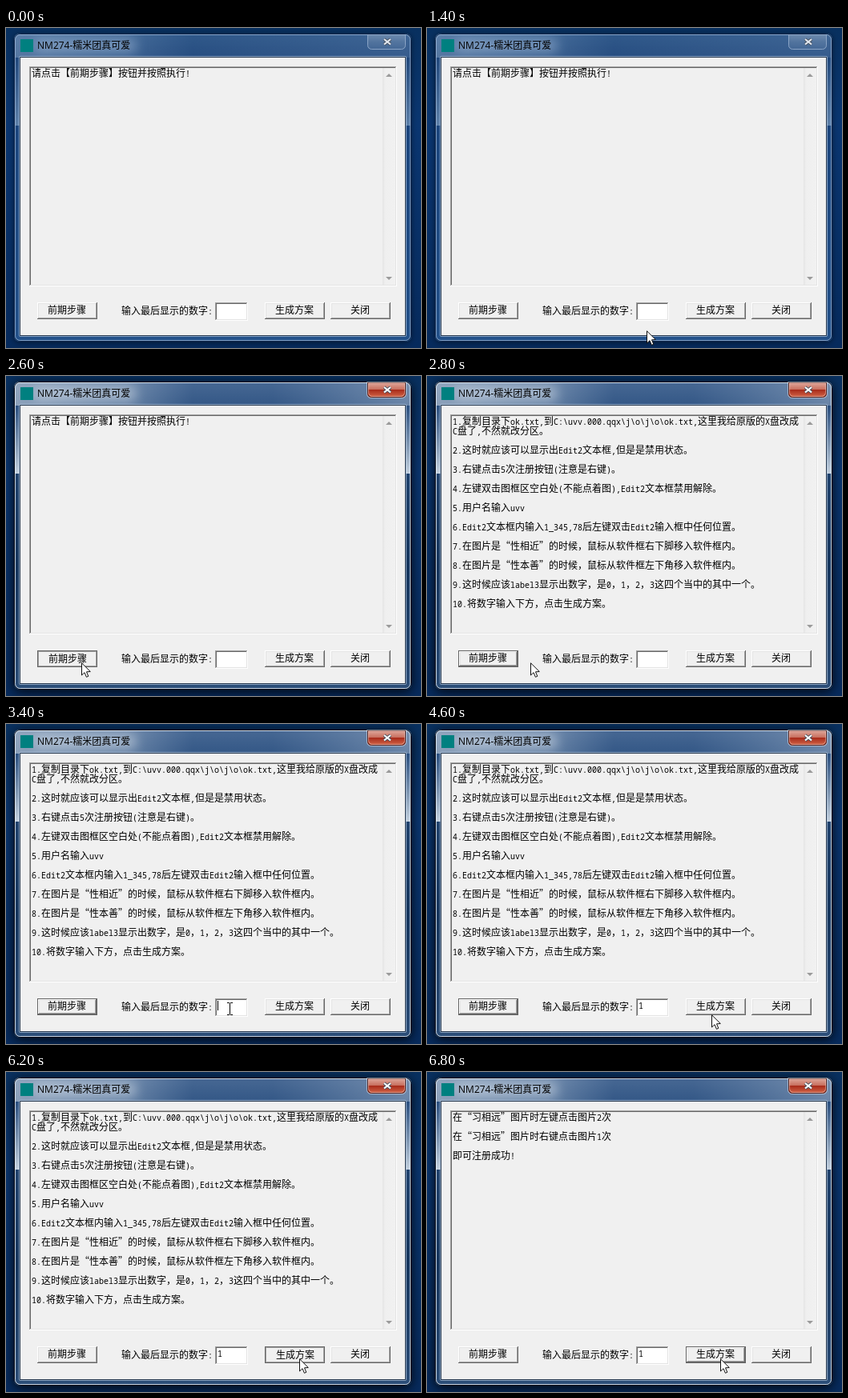
Write an HTML page with a canvas that moves like this. It is 518 px wide and 400 px high and loops after 8000 ms.

```html
<!DOCTYPE html>
<html lang="zh-CN">
<head>
<meta charset="utf-8">
<style>
html, body { margin: 0; width: 100%; height: 100%; overflow: hidden; background: #082d61; }
canvas { display: block; }
</style>
</head>
<body>
<canvas id="stage" width="518" height="400"></canvas>
<script>
const g = document.getElementById('stage').getContext('2d');
const LOOP = 8000;
const CJK = '500 12px "Noto Sans CJK SC", "Noto Sans CJK", sans-serif';
const MONO = '500 10px "Noto Sans Mono", monospace';
const TITLE = '12px "Open Sans", "Noto Sans CJK SC", "Noto Sans CJK", sans-serif';

const INTRO = ['请点击【前期步骤】按钮并按照执行!'];
const STEPS = [
  '1.复制目录下ok.txt,到C:\\uvv.000.qqx\\j\\o\\j\\o\\ok.txt,这里我给原版的X盘改成',
  'C盘了,不然就改分区。', '',
  '2.这时就应该可以显示出Edit2文本框,但是是禁用状态。', '',
  '3.右键点击5次注册按钮(注意是右键)。', '',
  '4.左键双击图框区空白处(不能点着图),Edit2文本框禁用解除。', '',
  '5.用户名输入uvv', '',
  '6.Edit2文本框内输入1_345,78后左键双击Edit2输入框中任何位置。', '',
  '7.在图片是“性相近”的时候，鼠标从软件框右下脚移入软件框内。', '',
  '8.在图片是“性本善”的时候，鼠标从软件框左下角移入软件框内。', '',
  '9.这时候应该label3显示出数字，是0，1，2，3这四个当中的其中一个。', '',
  '10.将数字输入下方，点击生成方案。'
];
const RESULT = ['在“习相远”图片时左键点击图片2次', '', '在“习相远”图片时右键点击图片1次', '', '即可注册成功!'];

// time, pointer shape, x, y
const POINTER = [
  [0, null], [1000, 'resize', 270, 396], [1200, 'arrow', 274, 394], [1400, 'arrow', 274, 378],
  [1600, 'beam', 273, 355], [1800, 'beam', 274, 351], [2400, 'arrow', 94, 358],
  [2800, 'arrow', 129, 358], [3000, 'arrow', 244, 358], [3200, 'beam', 276, 348],
  [4000, null], [4600, 'arrow', 355, 363], [4800, 'arrow', 363, 363],
  [5000, 'arrow', 366, 357], [5200, 'arrow', 366, 358]
];
const CARET = [[0, 0], [3400, 264], [4000, 270], [4600, 0], [5000, 270], [5600, 0]];
const LEFT = [[0, 'normal'], [2600, 'pressed'], [2800, 'focus'], [6200, 'normal']];
const RIGHT = [[0, 'normal'], [6200, 'pressed'], [6800, 'focus']];
const CONTENT = [[0, INTRO], [2800, STEPS], [6800, RESULT]];

const at = (track, t) => track.filter(k => k[0] <= t).pop().slice(1);

function rect(x, y, w, h, c) {
  g.fillStyle = c;
  g.fillRect(x, y, w, h);
}

function blend(x0, y0, x1, y1, ...stops) {
  const s = g.createLinearGradient(x0, y0, x1, y1);
  stops.forEach(([p, c]) => s.addColorStop(p, c));
  return s;
}

function bevel(x, y, w, h, light, dark) {
  rect(x, y, w, 1, light);
  rect(x, y, 1, h, light);
  rect(x, y + h - 1, w, 1, dark);
  rect(x + w - 1, y, 1, h, dark);
}

function round(x, y, w, h, r) {
  g.beginPath();
  g.roundRect(x, y, w, h, r);
}

function outline(x, y, w, h, r, c) {
  round(x + .5, y + .5, w - 1, h - 1, r);
  g.strokeStyle = c;
  g.lineWidth = 1;
  g.stroke();
}

// Half-width characters take 6 px, full-width ones 12 px.
function text(s, x, top) {
  g.fillStyle = '#000';
  for (const run of s.match(/[ -~]+|[^ -~]+/g) || []) {
    g.font = run < '\x7f' ? MONO : CJK;
    g.fillText(run, x, top + 10);
    x += g.measureText(run).width;
  }
}

function button(label, x, w, state) {
  const y = 343, h = 21, down = state === 'pressed' ? 1 : 0;
  rect(x, y, w, h, '#f0f0f0');
  if (state === 'normal') {
    bevel(x, y, w, h, '#fff', '#696969');
    bevel(x + 1, y + 1, w - 2, h - 2, '#e3e3e3', '#a0a0a0');
  } else {
    bevel(x, y, w, h, '#646464', '#646464');
    if (down) bevel(x + 1, y + 1, w - 2, h - 2, '#a0a0a0', '#a0a0a0');
    else {
      bevel(x + 1, y + 1, w - 2, h - 2, '#fff', '#696969');
      bevel(x + 2, y + 2, w - 4, h - 4, '#e3e3e3', '#a0a0a0');
    }
  }
  text(label, x + Math.ceil((w - label.length * 12) / 2) - 1 + down, 347 + down);
}

function sunken(x, y, w, h, c) {
  rect(x, y, w, h, c);
  bevel(x, y, w, h, '#a0a0a0', '#fff');
  bevel(x + 1, y + 1, w - 2, h - 2, '#696969', '#e3e3e3');
}

function triangle(x, y, dir) {
  g.fillStyle = '#9a9a9a';
  g.beginPath();
  g.moveTo(x - 4, y + 2 * dir);
  g.lineTo(x + 4, y + 2 * dir);
  g.lineTo(x, y - 2 * dir);
  g.fill();
}

function closeBox(active) {
  const x = 451, y = 8, w = 48, h = 19, r = [0, 0, 5, 5];
  round(x, y, w, h, r);
  g.fillStyle = active
    ? blend(0, y, 0, y + h, [0, '#e0aa9e'], [.45, '#c8705f'], [.5, '#a92c1b'], [1, '#d4694b'])
    : blend(0, y, 0, y + h, [0, 'rgba(255,255,255,.25)'], [.5, 'rgba(255,255,255,.12)'], [1, 'rgba(255,255,255,.06)']);
  g.fill();
  outline(x, y, w, h, r, active ? '#4a1d1d' : '#8ba5c6');
  if (active) {
    outline(x - 1, y - 1, w + 2, h + 2, r, 'rgba(230,238,247,.5)');
    outline(x + 1, y, w - 2, h - 1, r, 'rgba(255,220,210,.5)');
  }
  for (const [size, c] of [[4, '#45505f'], [2.2, active ? '#fff' : '#e2e8f0']]) {
    g.strokeStyle = c;
    g.lineWidth = size;
    g.beginPath();
    g.moveTo(472, 14); g.lineTo(480, 20.5);
    g.moveTo(480, 14); g.lineTo(472, 20.5);
    g.stroke();
  }
}

function frame(active) {
  const x = 10, y = 7, w = 496, h = 385;
  rect(0, 0, 518, 400, blend(0, 0, 0, 400, [0, '#08305f'], [.3, '#0a3671'], [1, '#062a5c']));
  g.save();
  g.shadowColor = active ? 'rgba(0,0,0,.9)' : 'rgba(0,0,0,.5)';
  g.shadowBlur = active ? 14 : 7;
  g.shadowOffsetY = active ? 2 : 1;
  round(x, y, w, h, 7);
  g.fillStyle = '#1d4578';
  g.fill();
  g.restore();

  g.save();
  round(x, y, w, h, 7);
  g.clip();
  rect(x, y, w, h, active
    ? blend(0, y, 0, y + h, [0, '#3f618e'], [.075, '#2a4f80'], [.2, '#7f97b3'], [.298, '#c3d0de'], [.3, '#22446f'], [.6, '#17375f'], [1, '#2c4e78'])
    : blend(0, y, 0, y + h, [0, '#2c5587'], [.075, '#22497d'], [.298, '#5e81aa'], [.3, '#1c467e'], [1, '#23518a']));
  rect(x, y, w, 30, active
    ? blend(x, 0, x + w, 0, [0, 'rgba(205,215,225,.6)'], [.28, 'rgba(195,208,222,.4)'], [.45, 'rgba(170,190,212,.08)'], [.65, 'rgba(170,190,212,.08)'], [1, 'rgba(200,212,226,.42)'])
    : blend(x, 0, x + w, 0, [0, 'rgba(170,195,222,.38)'], [.28, 'rgba(160,188,218,.22)'], [.45, 'rgba(150,180,215,.04)'], [1, 'rgba(150,180,215,.18)']));
  g.filter = 'blur(7px)';
  rect(36, 14, 126, 16, active ? 'rgba(225,233,241,.5)' : 'rgba(180,203,228,.45)');
  g.filter = 'none';
  g.restore();

  outline(x, y, w, h, 7, active ? '#060c16' : '#10264a');
  outline(x + 1, y + 1, w - 2, h - 2, 6, active ? 'rgba(228,238,249,.85)' : 'rgba(165,192,225,.7)');
  outline(x + 6, y + 28, w - 12, h - 34, 1, 'rgba(190,210,232,.65)');
  outline(x + 7, y + 29, w - 14, h - 36, 0, '#26384f');
  rect(x + 8, y + 30, w - 16, h - 38, '#f0f0f0');

  rect(18, 14, 16, 16, '#008080');
  g.font = TITLE;
  g.fillStyle = '#000';
  g.fillText('NM274-糯米团真可爱', 39, 26);
  closeBox(active);
}

function path(points) {
  g.beginPath();
  points.forEach(([x, y]) => g.lineTo(x, y));
  g.closePath();
  g.fillStyle = '#fff';
  g.strokeStyle = '#111';
  g.lineWidth = 1;
  g.fill();
  g.stroke();
}

const shapes = {
  arrow() {
    path([[.5, .8], [.5, 16], [4, 12.7], [6.4, 18.3], [8.8, 17.3], [6.5, 11.8], [11.3, 11.5]]);
  },
  beam() {
    rect(3, 1, 1, 14, '#000');
    for (const y of [0, 15]) {
      rect(0, y, 3, 1, '#000');
      rect(4, y, 3, 1, '#000');
    }
  },
  resize() {
    path([[4.5, .7], [8.5, 5], [5.5, 5], [5.5, 17], [8.5, 17], [4.5, 22], [.5, 17], [3.5, 17], [3.5, 5], [.5, 5]]);
  }
};

function draw(t) {
  frame(t >= 2600);

  sunken(29, 48, 459, 275, '#f0f0f0');
  rect(470, 50, 16, 271, blend(470, 0, 486, 0, [0, '#e4e4e4'], [.2, '#efefef'], [1, '#f1f1f1']));
  triangle(478, 59, 1);
  triangle(478, 313, -1);
  at(CONTENT, t)[0].forEach((line, i) => text(line, 32, 51 + i * 12));

  button('前期步骤', 39, 75, at(LEFT, t)[0]);
  button('生成方案', 323, 75, at(RIGHT, t)[0]);
  button('关闭', 405, 75, 'normal');
  text('输入最后显示的数字:', 144, 348);

  sunken(261, 343, 41, 23, '#fff');
  if (t >= 4000) text('1', 264, 346);
  const [caret] = at(CARET, t);
  if (caret) rect(caret, 346, 1, 12, '#000');

  const [shape, x, y] = at(POINTER, t);
  if (shape) {
    g.save();
    g.translate(x, y);
    shapes[shape]();
    g.restore();
  }
}

function tick(now) {
  draw(now % LOOP);
  requestAnimationFrame(tick);
}
draw(0);
requestAnimationFrame(tick);
</script>
</body>
</html>
```
